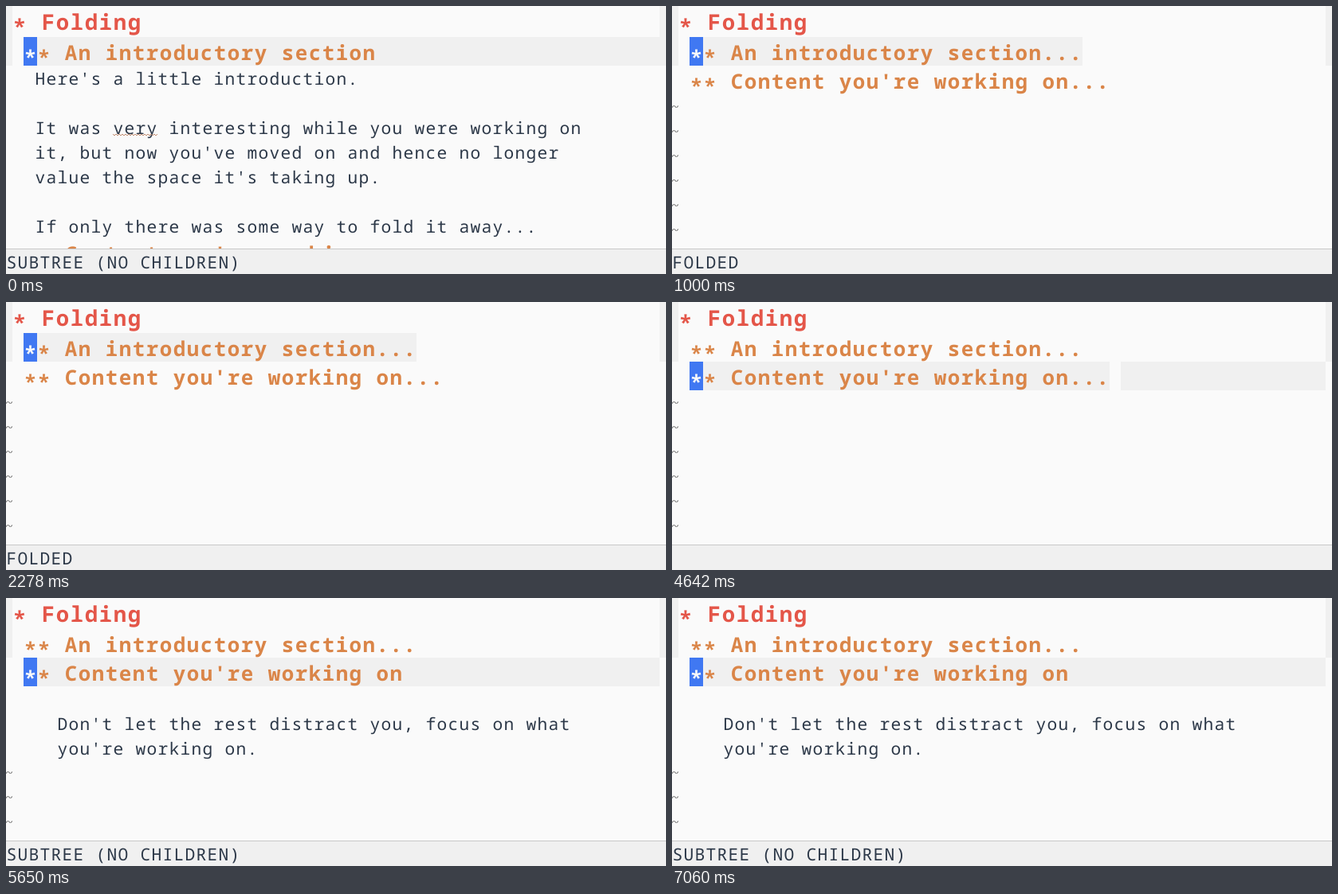
An HTML page for the animation above (8 s loop, 828x337 px).

```html
<!DOCTYPE html>
<html lang="en">
<head>
<meta charset="utf-8">
<title>Folding</title>
<style>
  html, body { margin: 0; width: 100%; height: 100%; overflow: hidden; background: #fafafa; }
  svg { display: block; }
  text { white-space: pre; text-rendering: geometricPrecision; font-variant-ligatures: none; }
</style>
</head>
<body>
<svg id="stage" width="828" height="337" viewBox="0 0 828 337"></svg>
<script>
const FAMILY = '"Noto Sans Mono", "DejaVu Sans Mono", monospace';
const LOOP = 8000;
const SHADE = '#f0f0f0', PAPER = '#fafafa', INK = '#2c3848';
const RED = '#e45649', ORANGE = '#da8548', BLUE = '#4078f2';
const LINE = 31, HEAD = 36;
const CAP = 1.093; // capital height per character cell width
const stage = document.getElementById('stage');

const pen = document.createElement('canvas').getContext('2d');
pen.font = `100px ${FAMILY}`;
const glyphWidth = pen.measureText('n').width / 100;
const capHeight = pen.measureText('H').actualBoundingBoxAscent / 100;

function add(parent, tag, attrs, content) {
  const el = document.createElementNS('http://www.w3.org/2000/svg', tag);
  for (const key in attrs) el.setAttribute(key, attrs[key]);
  if (content) el.textContent = content;
  parent.appendChild(el);
  return el;
}

function rect(g, x, y, width, height, fill) {
  return add(g, 'rect', { x, y, width, height, fill });
}

// Sets the font size by capital height and centres each glyph in its cell
function write(g, str, x, y, cell, fill, weight = 400) {
  const size = cell * CAP / capHeight;
  const gap = cell - size * glyphWidth;
  add(g, 'text', {
    x: x + gap / 2, y, fill, 'font-family': FAMILY, 'font-weight': weight,
    'font-size': size, 'letter-spacing': gap
  }, str);
}

// Stars sit at the middle of the capitals
function stars(g, str, x, y, cell, fill) {
  write(g, str, x, y + cell * 0.34, cell, fill, 700);
}

function heading(g, title, top, active) {
  const y = top + 29;
  if (active) rect(g, 22, top, 17, HEAD, BLUE);
  stars(g, '*', 22, y, 17, active ? PAPER : ORANGE);
  stars(g, '*', 39, y, 17, ORANGE);
  write(g, title, 73, y, 17, ORANGE, 700);
}

function body(g, lines, x, top) {
  lines.forEach((str, i) => str && write(g, str, x, top + i * LINE + 24, 14, INK));
}

function squiggle(g, x, y, width) {
  let d = `M${x} ${y}`;
  for (let i = 2; i <= width; i += 2) d += `L${x + i} ${y + (i % 4 ? 2 : 0)}`;
  add(g, 'path', { d, fill: 'none', stroke: '#c08c70', 'stroke-width': 1 });
}

// Small fringe marks for lines past the end of the text
function tildes(g, first) {
  for (let y = first; y < 290; y += LINE) {
    [113, 219, 142].forEach((bits, row) => {
      for (let x = 0; x < 8; x++) {
        if (bits & (128 >> x)) rect(g, x, y + row, 1, 1, '#a0a0a0');
      }
    });
  }
}

function scene(status, draw) {
  const g = add(stage, 'g', { visibility: 'hidden' });
  rect(g, 0, 0, 828, 337, PAPER);
  rect(g, 0, 0, 8, 75, SHADE);
  rect(g, 820, 0, 8, 75, SHADE);
  stars(g, '*', 8, 30, 18, RED);
  write(g, 'Folding', 44, 30, 18, RED, 700);
  draw(g);
  rect(g, 0, 305, 828, 32, SHADE);
  rect(g, 0, 305, 828, 1, '#c8c8c8');
  write(g, status, 0, 330, 14, INK);
  return g;
}

const INTRO = 'An introductory section';
const CONTENT = "Content you're working on";

const open = scene('SUBTREE (NO CHILDREN)', g => {
  rect(g, 22, 39, 798, HEAD, SHADE);
  heading(g, INTRO, 39, true);
  body(g, [
    "Here's a little introduction.",
    '',
    'It was very interesting while you were working on',
    "it, but now you've moved on and hence no longer",
    "value the space it's taking up.",
    '',
    'If only there was some way to fold it away...'
  ], 36, 75);
  squiggle(g, 134, 161, 56);
  heading(g, CONTENT, 292, false);
});

const folded = scene('FOLDED', g => {
  rect(g, 22, 39, 493, HEAD, SHADE);
  heading(g, INTRO + '...', 39, true);
  heading(g, CONTENT + '...', 75, false);
  tildes(g, 125);
});

const moved = scene('', g => {
  rect(g, 22, 75, 527, HEAD, SHADE);
  rect(g, 563, 75, 257, HEAD, SHADE);
  heading(g, INTRO + '...', 39, false);
  heading(g, CONTENT + '...', 75, true);
  tildes(g, 125);
});

const focused = scene('SUBTREE (NO CHILDREN)', g => {
  rect(g, 22, 75, 798, HEAD, SHADE);
  heading(g, INTRO + '...', 39, false);
  heading(g, CONTENT, 75, true);
  body(g, [
    "Don't let the rest distract you, focus on what",
    "you're working on."
  ], 64, 142);
  tildes(g, 218);
});

const steps = [[0, open], [1000, folded], [3130, moved], [5650, focused]];
const start = performance.now();

function tick() {
  const t = (performance.now() - start) % LOOP;
  const current = steps.filter(([at]) => at <= t).pop()[1];
  for (const [, g] of steps) g.setAttribute('visibility', g === current ? 'visible' : 'hidden');
  requestAnimationFrame(tick);
}
tick();
</script>
</body>
</html>
```
